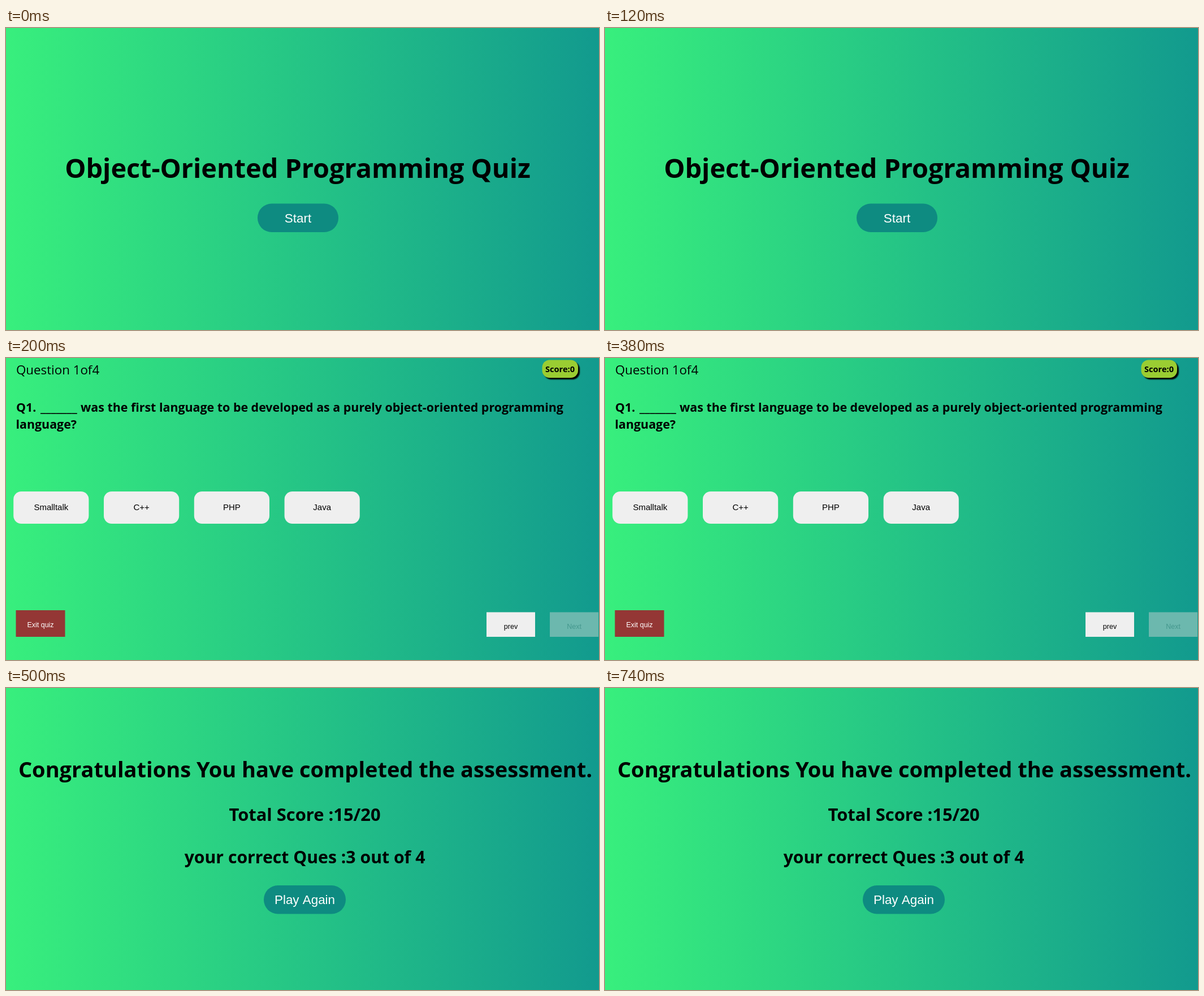
An HTML page with a canvas for the animation above (900 ms loop, 1049x534 px).

```html
<!DOCTYPE html>
<html lang="en">
<head>
<meta charset="utf-8">
<title>Quiz</title>
<style>
  html, body { margin: 0; width: 100%; height: 100%; overflow: hidden; background: #24c487; }
  canvas { display: block; }
</style>
</head>
<body>
<canvas id="stage" width="1049" height="534"></canvas>
<script>
const W = 1049, H = 534, LOOP = 900;
const ctx = document.getElementById('stage').getContext('2d');
const UI = '"Open Sans", "Noto Sans", sans-serif';
const BUTTON = '"Liberation Sans", Arial, sans-serif';

const backdrop = ctx.createLinearGradient(0, 0, W, 0);
backdrop.addColorStop(0, '#38ef7d');
backdrop.addColorStop(1, '#129a8e');

function text(str, x, y, size, { weight = 700, family = UI, color = '#000', align = 'left' } = {}) {
  ctx.font = `${weight} ${size}px ${family}`;
  ctx.fillStyle = color;
  ctx.textAlign = align;
  ctx.fillText(str, x, y);
}

function box(x, y, w, h, r, color) {
  ctx.fillStyle = color;
  ctx.beginPath();
  ctx.roundRect(x, y, w, h, r);
  ctx.fill();
}

function button(label, x, y, w, h, r, fill, size, baseline, color) {
  box(x, y, w, h, r, fill);
  text(label, x + w / 2, baseline, size, { weight: 400, family: BUTTON, color, align: 'center' });
}

function pill(label, x, y, w) {
  button(label, x, y, w, 50.5, 25, '#0e8b81', 22.4, y + 33, '#fff');
}

function startScreen() {
  text('Object-Oriented Programming Quiz', 516, 265, 46.8, { align: 'center' });
  pill('Start', 445, 310.5, 143);
}

function scoreBadge() {
  ctx.save();
  ctx.shadowColor = '#000';
  ctx.shadowOffsetX = ctx.shadowOffsetY = 3;
  ctx.shadowBlur = 2;
  box(948.5, 3.5, 63.5, 31.5, 13, '#9acd32');
  ctx.restore();
  text('Score:0', 980, 25, 14.6, { align: 'center' });
}

function questionScreen() {
  text('Question 1of4', 18, 29, 22.3, { weight: 400 });
  scoreBadge();

  text('Q1.', 18, 95, 21.4);
  text('_______', 61, 95, 22.5);
  text('was the first language to be developed as a purely object-oriented programming', 132, 95, 21.4);
  text('language?', 17.5, 125, 21.4);

  ['Smalltalk', 'C++', 'PHP', 'Java'].forEach((answer, i) =>
    button(answer, 13.2 + i * 159.8, 236, 133.2, 57, 14, '#efefef', 15, 269, '#000'));

  button('Exit quiz', 17.5, 446, 87, 47, 0, '#943735', 12.5, 476, '#fff');
  button('prev', 850, 449.5, 86, 43.5, 0, '#efefef', 12.5, 479, '#000');
  button('Next', 962, 449.5, 86, 43.5, 0, '#6cb8ae', 12.5, 479, '#45988e');
}

function resultScreen() {
  const center = { align: 'center' };
  text('Congratulations You have completed the assessment.', 529.5, 158, 38, center);
  text('Total Score :15/20', 528.5, 235, 30.9, center);
  text('your correct Ques :3 out of 4', 528.5, 310, 30.2, center);
  pill('Play Again', 456, 349, 145);
}

function draw(now) {
  const t = now % LOOP;
  ctx.fillStyle = backdrop;
  ctx.fillRect(0, 0, W, H);
  if (t < 200) startScreen();
  else if (t < 500) questionScreen();
  else resultScreen();
}

let begin;
function tick(now) {
  begin ??= now;
  draw(now - begin);
  requestAnimationFrame(tick);
}
draw(0);
requestAnimationFrame(tick);
</script>
</body>
</html>
```
